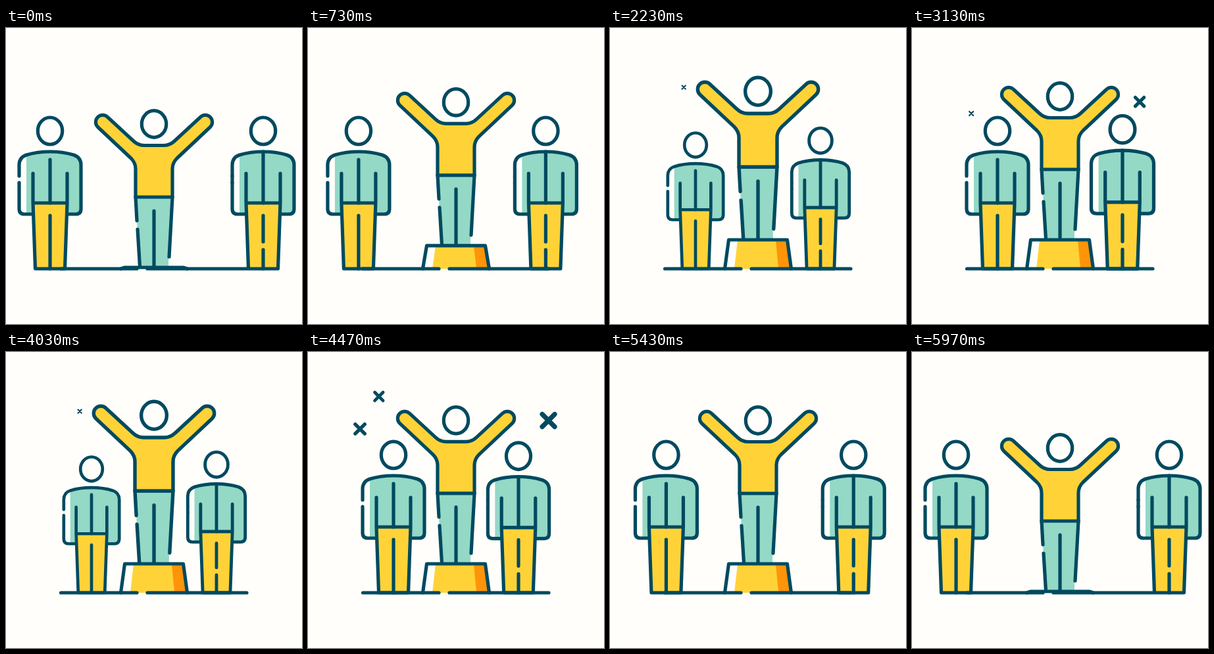
An HTML page for the animation above (6010 ms loop, 450x450 px).

```html
<!DOCTYPE html>
<html lang="en">
<head>
<meta charset="utf-8">
<title>Winner on the podium</title>
<style>
  html, body { margin: 0; width: 100%; height: 100%; overflow: hidden; background: #fffefa; }
  svg { display: block; width: 100vw; height: 100vh; }
  .line { fill: none; stroke: #004a60; stroke-width: 5.2; stroke-linecap: round; stroke-linejoin: round; }
  .paper { fill: #fffefa; }
  .yellow { fill: #ffd338; }
  .mint { fill: #94d8c6; }
  .orange { fill: #ff9408; }
</style>
</head>
<body>
<svg viewBox="0 0 450 450">
  <defs>
    <!-- side figure, feet centred on the origin -->
    <g id="side">
      <path class="paper" d="M-47-158Q-47-169-36-173Q-20-178 0-178V-83H-39Q-47-83-47-91Z"/>
      <path class="mint" d="M-36-173Q-20-178 0-178Q20-178 36-173Q47-169 47-158V-91Q47-83 39-83H-36Z"/>
      <path class="yellow" d="M-25.500-100H25.500L22.500 0H-22.500Z"/>
      <path class="line" d="M-47-141V-158Q-47-169-36-173Q-20-178 0-178Q20-178 36-173Q47-169 47-158V-91Q47-83 39-83H26
        M-47-131V-91Q-47-83-39-83H-26
        M-26-145V-100L-22.500 0H22.500L26-100V-145M-26-100H26"/>
      <ellipse class="line" cy="-209.500" rx="18.700" ry="20.500"/>
    </g>
    <path id="cross" class="line" d="M-6.800-6.800L6.800 6.800M6.800-6.800L-6.800 6.800"/>
  </defs>

  <g id="left">
    <use href="#side"/>
    <path class="line" d="M0-166V-100M0-81V0"/>
  </g>
  <g id="right">
    <use href="#side"/>
    <path class="line" d="M0-178V-100M0-81V-41M0-29V0M-47-141V-131"/>
  </g>

  <g id="winner">
    <!-- feet centred on the origin -->
    <g transform="translate(-225 -322)">
      <path class="mint" d="M197 215H253L247 306V322H203Z"/>
      <path class="line" d="M197 215L199 251M200 264L203.500 321M253 215L248 306M225 236V321"/>
      <path class="yellow" id="shirt" d="M197 215V172Q197 163 190 156L139.500 108.500A10.600 10.600 0 0 1 154.500 93.500L194 130Q201 136.500 210 136.500H240Q249 136.500 256 130L295.500 93.500A10.600 10.600 0 0 1 310.500 108.500L260 156Q253 163 253 172V215Z"/>
      <use href="#shirt" class="line" style="fill-opacity:0"/>
      <ellipse class="line" cx="225" cy="104" rx="18.700" ry="20.300"/>
    </g>
  </g>

  <path id="podiumYellow" class="yellow"/>
  <path id="podiumOrange" class="orange"/>
  <path id="podiumLine" class="line"/>
  <path class="line" d="M83.500 366H199M215 366H366"/>

  <g id="crosses"></g>
</svg>
<script>
  const LOOP = 6010, BEAT = 1800, FLOOR = 366;
  const el = id => document.getElementById(id);
  const clamp = v => Math.min(1, Math.max(0, v));
  const part = (t, start, length) => clamp((t - start) / length);
  const sine = p => (1 - Math.cos(Math.PI * p)) / 2;
  const cubic = p => p < 0.5 ? 4 * p ** 3 : 1 - 4 * (1 - p) ** 3;
  const bump = (t, start, length) => Math.sin(Math.PI * part(t, start, length)) ** 2;
  // Everything in the cheering beat happens twice.
  const fold = (t, start) => t >= start + BEAT ? t - BEAT : t;

  // Each cross swells while drifting out by dx, dy, then shrinks back.
  const crosses = [
    { x: 112.5, y: 92, dx: -6, dy: -31, size: 1, start: 2180, length: 960 },
    { x: 91, y: 131, dx: -12, dy: -14, size: 1.05, start: 2280, length: 1050 },
    { x: 335.5, y: 116.5, dx: 34, dy: -14, size: 1.45, start: 2350, length: 1150 }
  ];
  for (const c of crosses) {
    c.node = document.createElementNS("http://www.w3.org/2000/svg", "use");
    c.node.setAttribute("href", "#cross");
    el("crosses").append(c.node);
  }

  function place(node, x, y, scale) {
    node.setAttribute("transform", `translate(${x} ${y}) scale(${scale})`);
  }

  function drawPodium(top) {
    el("podiumYellow").setAttribute("d", `M194 ${top}H253L256 ${FLOOR}H189Z`);
    el("podiumOrange").setAttribute("d", `M252 ${top}H269L275 ${FLOOR}H256Z`);
    el("podiumLine").setAttribute("d", `M174.500 ${FLOOR}L180.500 ${top}H269.500L275.500 ${FLOOR}`);
  }

  function draw(t) {
    const beat = fold(t, 1880);
    const leave = sine(part(t, 4820, 960));
    const leftIn = sine(part(t, 420, 1200)) - leave;
    const rightIn = sine(part(t, 150, 1300)) - leave;
    const rise = cubic(part(t, 250, 770)) - cubic(part(t, 5550, 420));
    const top = 364 - 42 * rise;

    place(el("left"), 67 + 63 * leftIn, FLOOR, 1 - 0.106 * bump(beat, 1880, 800));
    place(el("right"), 391 - 71 * rightIn, FLOOR,
      1 - 0.088 * bump(beat, 1950, 800) + 0.011 * bump(beat, 2750, 760));
    place(el("winner"), 225, top, 1 + 0.038 * bump(beat, 1900, 800));
    drawPodium(top);

    for (const c of crosses) {
      const p = part(fold(t, c.start), c.start, c.length);
      const swell = Math.sin(Math.PI * p ** 0.7);
      const drift = swell ** 3;
      c.node.style.display = swell > 0.01 ? "" : "none";
      place(c.node, c.x + c.dx * drift, c.y + c.dy * drift, c.size * swell);
    }
  }

  function tick() {
    draw(performance.now() % LOOP);
    requestAnimationFrame(tick);
  }
  tick();
</script>
</body>
</html>
```
